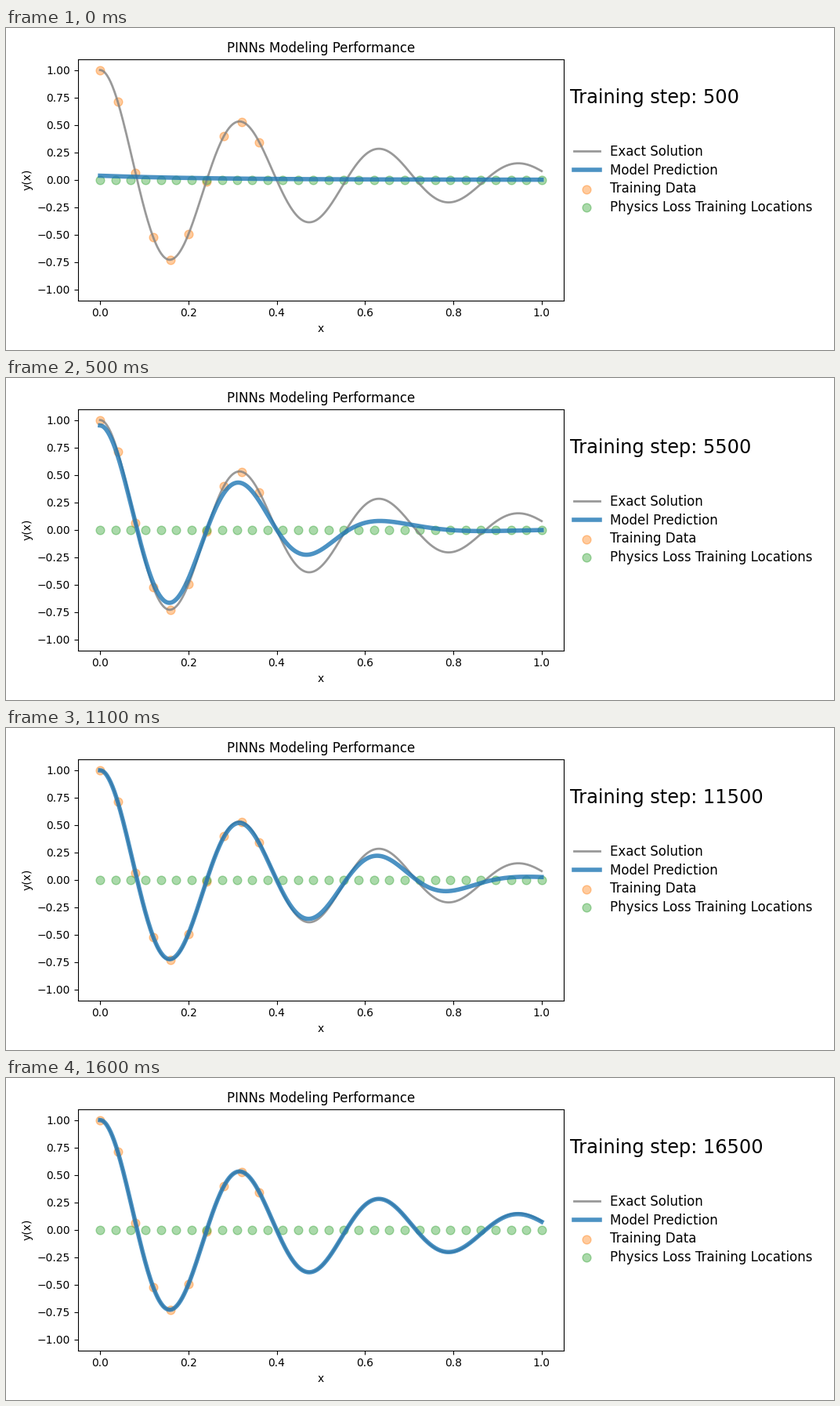
A matplotlib script that plays this animation: 1057x411 px, repeating every 1.65 s.

```python
import numpy as np
import matplotlib.pyplot as plt
from matplotlib.animation import FuncAnimation

W, H, DPI = 1057, 411, 100
FRAMES, INTERVAL, STEPS_PER_FRAME = 33, 50, 500
DAMPING, OMEGA0 = 2, 20
OMEGA = np.sqrt(OMEGA0**2 - DAMPING**2)

plt.rcParams["font.family"] = "DejaVu Sans"


def oscillator(x):
    """Underdamped oscillator released from y = 1 at rest."""
    return np.exp(-DAMPING * x) * (
        np.cos(OMEGA * x) + DAMPING / OMEGA * np.sin(OMEGA * x))


def sigmoid(u):
    return 1 / (1 + np.exp(-u))


def early_guess(x, t):
    """Nearly flat curve that turns into a weak ripple."""
    flat = 0.037 * np.exp(-4 * x)
    ripple = (0.085 * np.exp(-5 * x) * np.cos(13 * x)
              + 0.018 * np.exp(-((x - 0.57) / 0.2)**2))
    mix = min((t - 1) / 5, 1)
    return (1 - mix) * flat + mix * ripple


def learned_wave(x, t):
    """True solution up to a moving front; beyond it, damped and lagging."""
    front = np.interp(t, [6, 11, 15, 23, 28, 33],
                      [0.30, 0.53, 0.65, 0.79, 1.11, 1.33])
    ahead = x - front
    lag = 0.4 * 0.05 * np.log1p(np.exp((ahead - 0.08) / 0.05))
    return sigmoid(-ahead / 0.13) * oscillator(x - lag)


def prediction(x, t):
    learned = sigmoid((t - 8.7) / 0.7)
    return (1 - learned) * early_guess(x, t) + learned * learned_wave(x, t)


x = np.linspace(0, 1, 500)
exact = oscillator(x)

fig = plt.figure(figsize=(W / DPI, H / DPI), dpi=DPI, facecolor="white")
ax = fig.add_axes([91.9 / W, 63.28 / H, 620 / W, 308 / H])
ax.plot(x, exact, color="grey", lw=2, alpha=0.8, label="Exact Solution")
model, = ax.plot(x, prediction(x, 1), color="tab:blue", lw=4, alpha=0.8,
                 label="Model Prediction")
ax.scatter(x[:200:20], exact[:200:20], s=60, color="tab:orange", alpha=0.4,
           label="Training Data")
ax.scatter(np.linspace(0, 1, 30), np.zeros(30), s=60, color="tab:green",
           alpha=0.4, label="Physics Loss Training Locations")
ax.set(xlim=(-0.05, 1.05), ylim=(-1.1, 1.1), xlabel="x", ylabel="y(x)",
       title="PINNs Modeling Performance")
ax.legend(loc=(1.01, 0.335), frameon=False, fontsize="large",
          labelspacing=0.34)
counter = ax.text(1.065, 0.7, "", fontsize="xx-large", color="black")


def update(frame):
    t = frame + 1
    model.set_ydata(prediction(x, t))
    counter.set_text(f"Training step: {t * STEPS_PER_FRAME}")
    return model, counter


anim = FuncAnimation(fig, update, frames=FRAMES, interval=INTERVAL, repeat=True)
plt.show()
```
